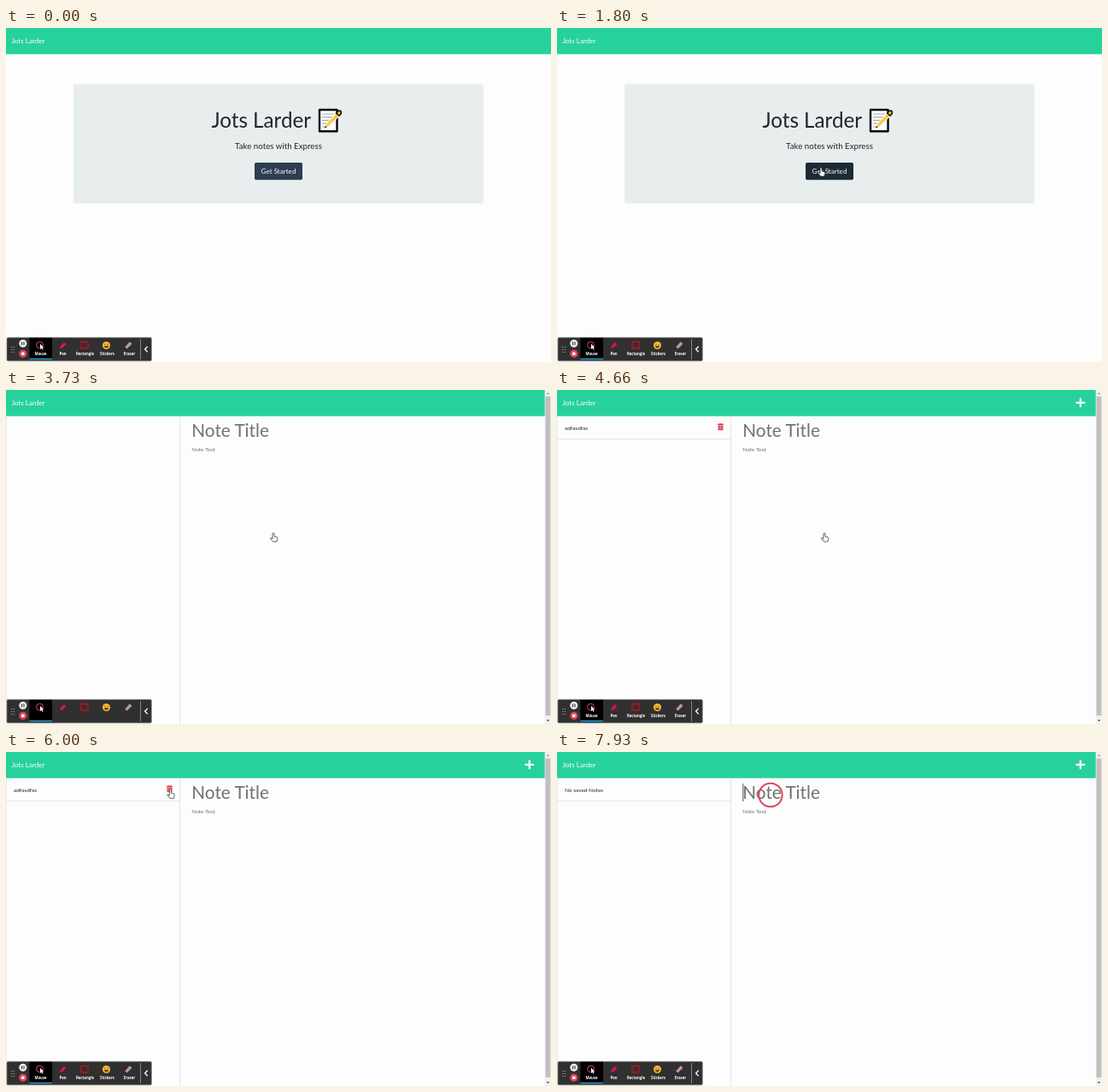
An HTML page for the animation above (8000 ms loop, 638 px wide and 392 px high).

```html
<!DOCTYPE html>
<html lang="en">
<head>
<meta charset="utf-8">
<title>Jots Larder</title>
<style>
  html, body { margin: 0; width: 100%; height: 100%; overflow: hidden; background: #fdfdfd; }
  svg { display: block; width: 638px; height: 392px; font-family: Lato, sans-serif; }
  .label { font: 700 4.3px "Open Sans", sans-serif; fill: #fff; text-anchor: middle; }
  .body { font-size: 6.49px; fill: #212529; }
  .hint { fill: #6f7072; }
</style>
</head>
<body>
<svg viewBox="0 0 638 392">
  <rect width="638" height="392" fill="#fdfdfd"/>
  <rect width="638" height="30.7" fill="#27d19c"/>
  <text x="6.5" y="18" font-size="8.1" fill="#fff">Jots Larder</text>

  <g id="home">
    <rect x="79" y="65.7" width="480" height="140.3" rx="2" fill="#e8eeee"/>
    <g fill="#212529">
      <text x="240.5" y="116.7" font-size="24.2">Jots Larder</text>
      <text x="319" y="142" font-size="9.73" text-anchor="middle">Take notes with Express</text>
    </g>
    <g stroke="#080808" stroke-linejoin="round">
      <path d="M367 96H387.500V121.200H367Z" fill="#fff" stroke-width="2.4"/>
      <path d="M370 101H384M370 104.700H382M370 108.400H378M370 112.100H375M370 115.800H373" stroke="#aaa7b8" stroke-width="1.2"/>
      <path d="M373 117.500L374.700 112.500L387.500 99L391 102.300L378 115.500Z" fill="#f5cf4c" stroke="#fff" stroke-width="1"/>
      <path d="M386.500 100L389 97.500Q391 96.300 392.200 98Q393 99.700 391.500 101.500L390 103Z" fill="#e8b73c" stroke-width="1.5"/>
      <path d="M373 117.500L374 114.800L375.600 116.500Z" fill="#080808" stroke="none"/>
    </g>
    <rect id="focus" x="290.300" y="157.300" width="57.400" height="21.700" rx="2.500" fill="none" stroke="#8f9ca3" stroke-width="1.500"/>
    <rect id="button" x="291" y="158" width="56" height="20.300" rx="1.700"/>
    <text x="319" y="171" font-size="8.1" fill="#fff" text-anchor="middle">Get Started</text>
  </g>

  <g id="notes">
    <path d="M203.500 30.700V392M.3 30.700V392" stroke="#d8dadb" stroke-width=".7"/>
    <text class="hint" x="217.300" y="54.700" font-size="20.76">Note Title</text>
    <text class="hint body" x="217.300" y="72" style="fill:#6f7072">Note Text</text>
    <path id="caret" d="M217.800 37V58" stroke="#222" stroke-width=".8"/>
    <g id="loaded">
      <path d="M0 57.700H203.500" stroke="#d8dadb" stroke-width=".7"/>
      <text id="item" class="body" x="9" y="46.600"></text>
      <path d="M612.800 10.500V19.300M608.400 14.900H617.200" stroke="#fff" stroke-width="2.300" stroke-linecap="round"/>
      <g id="trash" fill="#df3b4d">
        <path d="M190 39.200H193L193.400 39.800H195V41H188V39.800H189.600ZM188.500 41.500H194.500V46.500Q194.500 47.300 193.700 47.300H189.300Q188.500 47.300 188.500 46.500Z"/>
        <path d="M190 42.500V46.200M191.500 42.500V46.200M193 42.500V46.200" stroke="#fff" stroke-width=".4"/>
      </g>
    </g>
    <rect x="630.700" width="7.300" height="392" fill="#f1f1f1"/>
    <rect x="631.500" y="7.500" width="5.800" height="374.500" fill="#c0c0c0"/>
    <path d="M632.700 5L634.400 2.800L636.100 5Z" fill="#999"/>
    <path d="M632.700 387L634.400 389.200L636.100 387Z" fill="#555"/>
  </g>

  <g id="toolbar">
    <rect x="1" y="363.300" width="169.300" height="27.500" rx="1.500" fill="#303030" stroke="#777" stroke-width=".7"/>
    <path d="M6.700 374V382M9.300 374V382" stroke="#bbb" stroke-width="1" stroke-dasharray="1 2"/>
    <circle cx="19.800" cy="370.300" r="4.500" fill="#f4f4f4"/>
    <path d="M18.600 368.300V372.300M21 368.300V372.300" stroke="#333" stroke-width="1.100"/>
    <circle cx="19.800" cy="382.300" r="4.600" fill="#e5405c"/>
    <rect x="18.100" y="380.600" width="3.400" height="3.400" fill="#fff"/>
    <rect x="27.400" y="363.700" width="26.600" height="25.300" fill="#000"/>
    <path d="M27.400 388.400H54" stroke="#1f9fd8" stroke-width="1.400"/>
    <circle cx="39.500" cy="372" r="3.900" fill="none" stroke="#e0465d" stroke-width="1"/>
    <path d="M40 370.800V377L41.500 375.700L42.500 377.800L43.500 377.300L42.500 375.300H44.300Z" fill="#fff"/>
    <path d="M63.200 376L64 373L68 369L70.300 371.200L66.200 375.200Z" fill="#e3173c"/>
    <rect x="88" y="368.500" width="8" height="7.500" fill="none" stroke="#c90d25" stroke-width="1.300"/>
    <circle cx="117.500" cy="372.500" r="4.500" fill="#f6bd35"/>
    <path d="M114.800 373H120.200Q119.700 375.800 117.500 375.800T114.800 373Z" fill="#6b3d18"/>
    <path d="M115.200 371.300H116.700M118.300 371.300H119.800" stroke="#6b3d18" stroke-width=".8"/>
    <path d="M139.200 374.500L144.800 368.400L147.300 370.600L141.700 376.500Z" fill="#d58d98"/>
    <path d="M142 371.500L144.800 368.400L147.300 370.600L144.400 373.700Z" fill="#a8a0a4"/>
    <path d="M157.500 365V389" stroke="#aaa" stroke-width=".7"/>
    <path d="M165.700 373.800L162.600 377L165.700 380.200" fill="none" stroke="#fff" stroke-width="1.300"/>
    <g id="labels" class="label"></g>
  </g>

  <g id="cursor" fill="#fff" stroke="#222" stroke-width=".7" stroke-linejoin="round">
    <path id="hand" d="M-1 .8A1 1 0 0 1 1 .8V4L4 4.700Q5 5 4.800 6.400L4 10H-.5L-3.300 6.600Q-3.900 5.400 -2.500 5.600L-1 6.800Z"/>
    <path id="arrow" d="M0 0V8.500L2 6.800L3.400 9.800L4.700 9.200L3.300 6.200H6Z"/>
    <path id="beam" d="M-1.500 -4H1.500M0 -4V4M-1.500 4H1.500" fill="none"/>
  </g>
  <circle id="ring" r="13.700" fill="none" stroke="#df4660" stroke-width="2"/>
</svg>
<script>
const $ = id => document.getElementById(id);
const show = (id, on) => { $(id).style.display = on ? '' : 'none'; };
const between = (t, from, to) => t >= from && t < to;

const LOOP = 8000, OPEN_NOTES = 3730, LOADED = 3860, DELETED = 6660;
const clicks = [[2730, 2930], [6460, 6600], [7930, LOOP]];
const path = [ // time, x, y
  [1130, 470, 394], [1800, 309, 164], [2060, 313, 168], [5060, 313, 168],
  [5460, 167, 53], [5860, 193, 45], [6200, 191.500, 43], [7000, 191.500, 43], [7660, 250, 50.500]
];

['Mouse', 'Pen', 'Rectangle', 'Stickers', 'Eraser'].forEach((name, i) => {
  $('labels').innerHTML += `<text x="${40.5 + 26 * i}" y="383.800">${name}</text>`;
});

function pointerAt(t) {
  const next = path.findIndex(p => p[0] > t);
  if (next < 0) return path[path.length - 1].slice(1);
  if (next === 0) return path[0].slice(1);
  const [t0, x0, y0] = path[next - 1], [t1, x1, y1] = path[next];
  const u = (t - t0) / (t1 - t0), k = u * u * (3 - 2 * u);
  return [x0 + (x1 - x0) * k, y0 + (y1 - y0) * k];
}

function cursorKind(t, x, y) {
  if (t < OPEN_NOTES) return between(x, 291, 347) && between(y, 158, 178.300) ? 'hand' : 'arrow';
  if (t < 5070) return 'hand';
  if (x > 204) return 'beam';
  return y < 58 ? 'hand' : 'arrow';
}

function draw(t) {
  const [x, y] = pointerAt(t);
  const kind = cursorKind(t, x, y);
  const click = clicks.some(([from, to]) => between(t, from, to));

  show('home', t < OPEN_NOTES);
  show('focus', t >= 2730);
  $('button').setAttribute('fill', kind === 'hand' ? '#1e2b37' : '#2c3e50');

  show('notes', t >= OPEN_NOTES);
  show('loaded', t >= LOADED);
  show('labels', !between(t, OPEN_NOTES, LOADED));
  show('trash', t < DELETED);
  show('caret', t >= 7930);
  $('item').textContent = t < DELETED ? 'adfasdfas' : 'No saved Notes';

  show('cursor', t >= 1130 && !(click && kind === 'beam'));
  for (const id of ['hand', 'arrow', 'beam']) show(id, id === kind);
  show('ring', click);
  for (const id of ['cursor', 'ring']) $(id).setAttribute('transform', `translate(${x} ${y})`);
}

const start = performance.now();
function tick() {
  draw((performance.now() - start) % LOOP);
  requestAnimationFrame(tick);
}
tick();
</script>
</body>
</html>
```
